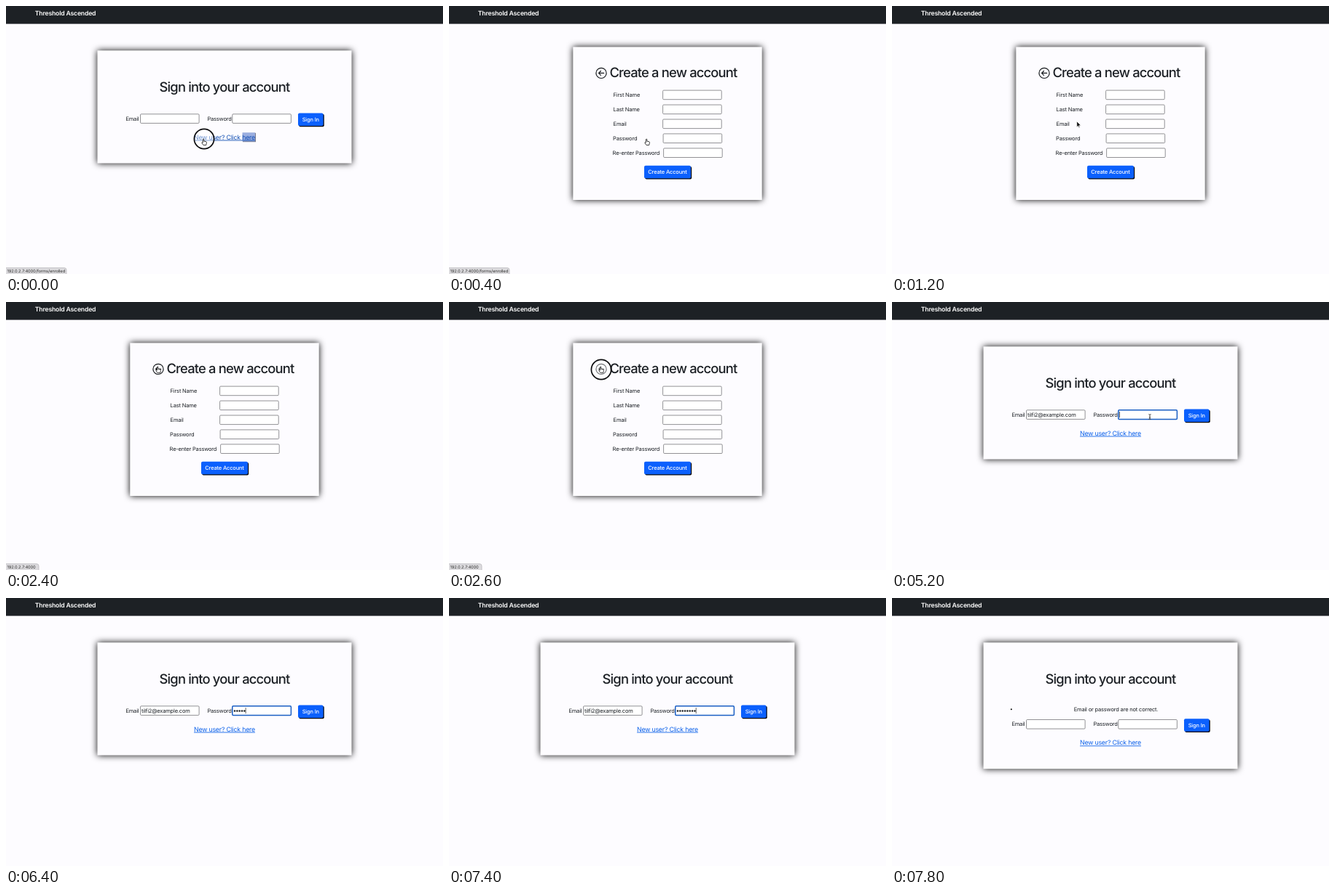
An HTML page for the animation above (8000 ms loop, 600 by 369 pixels).

```html
<!DOCTYPE html>
<html lang="en">
<head>
<meta charset="utf-8">
<title>Sign in</title>
<style>
  html, body { margin: 0; width: 100%; height: 100%; overflow: hidden; background: #fdfcff; }
  svg { display: block; width: 100vw; height: 100vh; }
  text {
    font: 400 7.5px Inter, "Open Sans", sans-serif;
    font-optical-sizing: none;
    letter-spacing: -.024em;
    text-rendering: geometricPrecision;
    fill: #1c2025;
  }
  .mid { text-anchor: middle; }
  .title { font-size: 18.4px; font-weight: 500; letter-spacing: -.045em; }
  .brand { font-size: 8.7px; font-weight: 600; fill: #fff; }
  .link { font-size: 8.8px; fill: #0d62ea; text-decoration: underline; }
  .link.hover { fill: #1450b4; }
  .button { fill: #fff; font-weight: 500; }
  .status { font-size: 5.8px; letter-spacing: -.02em; fill: #333; }
  .card { fill: #fdfcff; filter: drop-shadow(0 0 4.7px #000); }
  .field { fill: #fff; stroke: #77767a; stroke-width: .8; }
  .field.focus { stroke: #1b5fc4; stroke-width: 1.5; }
  .icon { fill: none; stroke: #16191d; stroke-width: 1.2; stroke-linecap: round; stroke-linejoin: round; }
  .caret { fill: #222; }
</style>
</head>
<body>
<svg id="stage" viewBox="0 0 600 369" preserveAspectRatio="none"></svg>
<script>
const LOOP = 8000, STEP = 200, ERROR_SHIFT = 18.7;
const EMAIL = "tilfi2@example.com";

const label = (x, y, str, cls = "") => `<text x="${x}" y="${y}" class="${cls}">${str}</text>`;
const box = (x, y, w, h, attrs) => `<rect x="${x}" y="${y}" width="${w}" height="${h}" ${attrs}/>`;
const field = (x, y, id = "") => box(x, y, 80.6, 12.6, `rx="1.2" class="field" id="${id}"`);
const button = (x, y, w, str) =>
  box(x + 1.2, y + 1.2, w, 17.4, 'rx="2" fill="#080a10"') +
  box(x, y, w, 17.4, 'rx="2" fill="#0b60fd"') +
  label(x + w / 2, y + 11.4, str, "button mid");
const status = (id, w, str) =>
  `<g id="${id}"><path d="M-1 370V360.5H${w - 3}q3 0 3 3V370Z" fill="#dcdbde" stroke="#b5b4b8" stroke-width=".7"/>` +
  label(1.5, 367.3, str, "status") + "</g>";

const signIn = `<g id="signIn">
  ${box(125.5, 61.3, 349, 155.2, 'class="card" id="card"')}
  ${label(300, 118.4, "Sign into your account", "title mid")}
  <g id="error"><circle cx="163.8" cy="153.2" r="1"/>
    ${label(307.5, 155.7, "Email or password are not correct.", "mid")}</g>
  <g id="form">
    ${label(164.4, 157.8, "Email")}${field(184.5, 148.8, "email")}
    ${label(276.4, 157.8, "Password")}${field(310.8, 148.8, "password")}
    ${label(186, 157.8, "", "typed")}
    <g id="dots"></g>
    <rect id="caret" class="caret" y="151" width=".7" height="8.2"/>
    ${button(401, 147.6, 34.6, "Sign In")}
    <g id="selection" style="filter:blur(.7px)">${box(325, 174.8, 18, 12.4, 'fill="#77798c"')}
      ${box(324.5, 174.3, 17.5, 12, 'fill="#9aaee0"')}</g>
    ${label(300, 183.6, "New user? Click here", "link mid")}
  </g></g>`;

const names = ["First Name", "Last Name", "Email", "Password", "Re-enter Password"];
const rows = names.map((name, i) => {
  const y = 122.4 + i * 19.95, nudge = Math.max(0, i - 2) * .5;
  return label(225.6 - nudge, y + 2.8, name) + field(293.6 + nudge, y - 6.3);
}).join("");
const register = `<g id="register">
  ${box(170.3, 56.4, 259.4, 210.6, 'class="card"')}
  <circle class="icon" cx="209" cy="92.4" r="7.1"/>
  <path class="icon" d="M212.6 92.4H205.6M208.4 89.5L205.5 92.4L208.4 95.3"/>
  ${label(220.4, 97.8, "Create a new account", "title")}
  ${rows}${button(268, 219.8, 64, "Create Account")}</g>`;

const outline = 'stroke-width=".8" stroke-linejoin="round"';
const pointers = `<g id="pointer">
  <circle id="ring" r="13.6" cy="-1" fill="#fff" fill-opacity=".4" stroke="#0c0c0e" stroke-width="1.7"/>
  <path id="hand" fill="#fff" stroke="#111" ${outline}
    d="M-1.6 -3.4q.8 -.9 1.5 0V-.8L2.5 -.3Q3.6 0 3.4 1.2L2.7 4.6H-.9L-3.2 1.4Q-3.4 .3 -1.6 1Z"/>
  <path id="arrow" fill="#111" stroke="#fff" ${outline}
    d="M-2 -4V4.2L-.1 2.5L1.1 5.3L2.4 4.7L1.2 2H3.8Z"/>
  <path id="beam" fill="none" stroke="#222" stroke-width=".8"
    d="M-1.6 -3.4Q0 -3.4 0 -2.4V2.6Q0 3.5 -1.6 3.5M1.6 -3.4Q0 -3.4 0 -2.4M0 2.6Q0 3.5 1.6 3.5M-1 .9H1"/></g>`;

document.getElementById("stage").innerHTML =
  box(0, 0, 600, 369, 'fill="#fdfcff"') + box(0, 0, 600, 24.6, 'fill="#1d2125"') +
  label(39.8, 12.6, "Threshold Ascended", "brand") + signIn + register +
  status("longStatus", 83, "192.0.2.7:4000/forms/enrolled") +
  status("shortStatus", 45, "192.0.2.7:4000") + pointers;

const $ = id => document.getElementById(id);
const typed = document.querySelector(".typed"), link = document.querySelector(".link");
const show = (id, on) => $(id).setAttribute("visibility", on ? "inherit" : "hidden");
const clamp = (v, max) => Math.max(0, Math.min(max, v));

// time, x, y, pointer shape from then on
const path = [
  [0, 272, 187, "hand"], [800, 272, 187, "arrow"], [2000, 209, 93, "hand"],
  [2800, 209, 93, "arrow"], [3400, 217, 157, "beam"], [3800, 217, 157, ""],
  [4600, 240, 157, "beam"], [5000, 354, 158, "beam"], [5600, 354, 158, ""], [LOOP, 354, 158, ""]
];

function drawPointer(t) {
  const i = path.findIndex(p => p[0] > t) - 1;
  const [t0, x0, y0, shape] = path[i], [t1, x1, y1] = path[i + 1];
  const k = (t - t0) / (t1 - t0), e = k * k * (3 - 2 * k);
  $("pointer").setAttribute("transform", `translate(${x0 + (x1 - x0) * e} ${y0 + (y1 - y0) * e})`);
  for (const id of ["hand", "arrow", "beam"]) show(id, id === shape);
  $("ring").setAttribute("cy", t < 400 ? -4 : 0);
  show("ring", t < 200 || t === 2600);
}

function draw(t) {
  const registering = t >= 400 && t < 2800, failed = t >= 7600;
  show("signIn", !registering);
  show("register", registering);
  show("longStatus", t < 800);
  show("shortStatus", t >= 2000 && t < 2800);

  show("error", failed);
  $("card").setAttribute("height", 155.2 + (failed ? ERROR_SHIFT : 0));
  $("form").setAttribute("transform", `translate(0 ${failed ? ERROR_SHIFT : 0})`);
  show("selection", t < 400);
  link.classList.toggle("hover", t < 400);

  const inEmail = t >= 3400 && t < 5000, inPassword = t >= 5000 && !failed;
  $("email").classList.toggle("focus", inEmail);
  $("password").classList.toggle("focus", inPassword);
  const letters = failed ? 0 : clamp((t - 3600) / STEP * 4, EMAIL.length);
  const count = failed ? 0 : clamp((t - 5400) / STEP, 8);
  typed.textContent = EMAIL.slice(0, letters);
  $("dots").innerHTML = Array.from({ length: count }, (_, i) =>
    `<circle cx="${314 + i * 3.35}" cy="155.5" r="1.25" fill="#1c2025"/>`).join("");
  show("caret", !registering && (inEmail || inPassword));
  $("caret").setAttribute("x", inEmail
    ? 185.9 + (letters ? typed.getComputedTextLength() : 0)
    : 312 + count * 3.35);
  drawPointer(t);
}

const start = performance.now();
let last = -1;
function tick() {
  const t = Math.floor((performance.now() - start) % LOOP / STEP) * STEP;
  if (t !== last) draw(last = t);
  requestAnimationFrame(tick);
}
tick();
</script>
</body>
</html>
```
